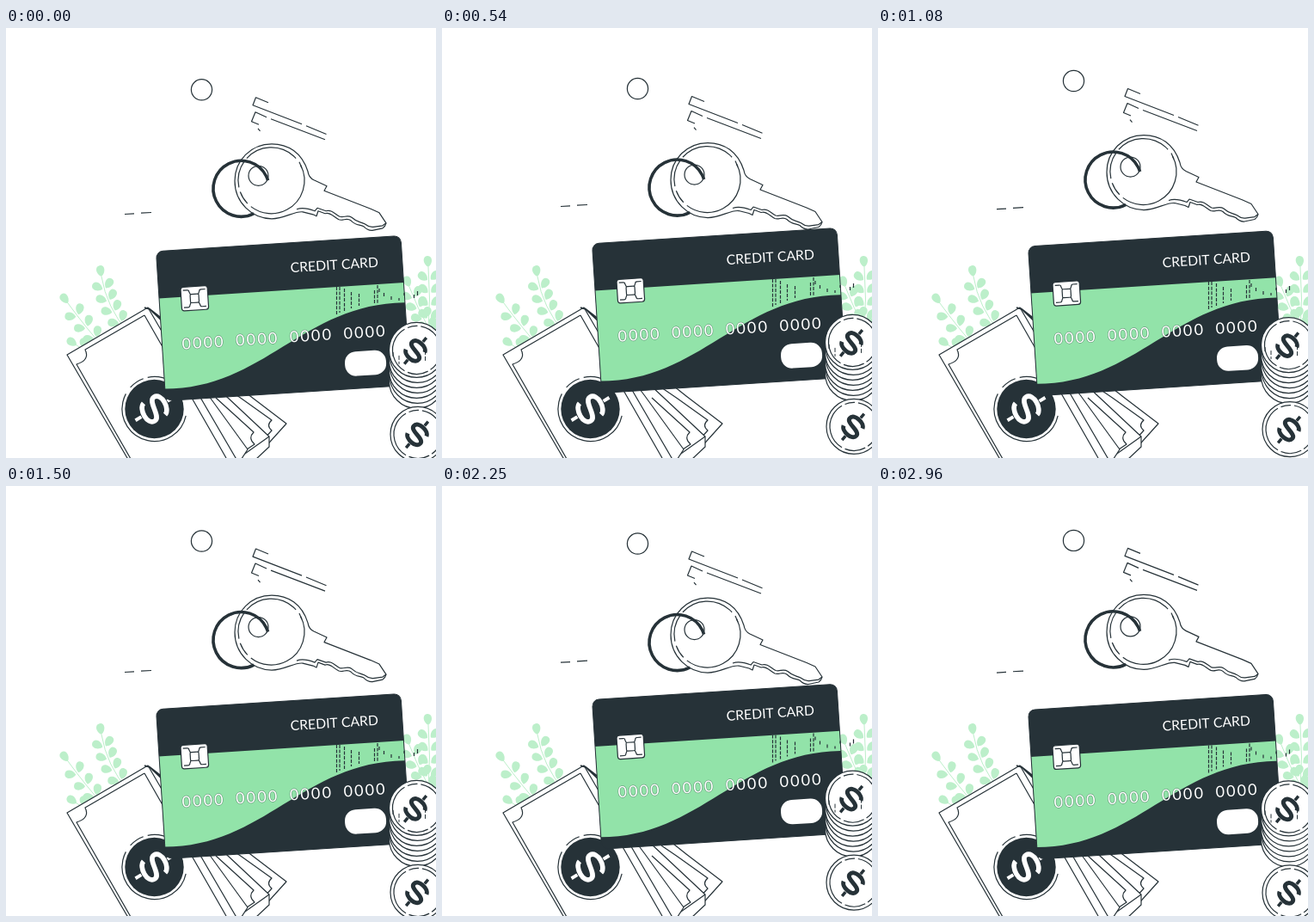
These frames come from a looping animation (500 by 500 pixels, 3 s). An HTML page with a canvas:

```html
<!DOCTYPE html>
<html lang="en">
<head>
<meta charset="utf-8">
<title>Credit card</title>
<style>
html, body { margin: 0; width: 100%; height: 100%; overflow: hidden; background: #fff; }
canvas { display: block; width: 500px; height: 500px; }
</style>
</head>
<body>
<canvas id="stage" width="500" height="500"></canvas>
<script>
const ctx = document.getElementById('stage').getContext('2d');
const DARK = '#263238', GREEN = '#92e3a9', LEAF = '#bcefca', WHITE = '#fff';
const LOOP = 3000, CYCLE = 1500, RISE = 12.5, LEAD = 35, KEY_DELAY = 500;

// Linear bob: up for half a cycle, down for the other half
function bob(t) {
  if (t <= 0) return 0;
  const p = (t % CYCLE) / CYCLE;
  return -RISE * (1 - Math.abs(1 - 2 * p));
}

function group(x, y, angle, draw) {
  ctx.save();
  ctx.translate(x, y);
  ctx.rotate(angle);
  draw();
  ctx.restore();
}

function stroke(path, width = 1.2, color = DARK) {
  ctx.lineWidth = width;
  ctx.strokeStyle = color;
  ctx.stroke(path);
}

function fill(path, color) {
  ctx.fillStyle = color;
  ctx.fill(path);
}

function line(d, width, color) {
  stroke(new Path2D(d), width, color);
}

function shape(d, color, width) {
  const p = new Path2D(d);
  fill(p, color);
  stroke(p, width);
}

function arc(x, y, r, from = 0, to = 360) {
  const p = new Path2D();
  p.arc(x, y, r, from * Math.PI / 180, to * Math.PI / 180);
  return p;
}

function box(x, y, w, h, r) {
  const p = new Path2D();
  p.roundRect(x, y, w, h, r);
  return p;
}

function dollar(x, y, deg, size, color, width) {
  group(x, y, deg * Math.PI / 180, () => {
    ctx.scale(size, size);
    line('M10 -6C8 -13 -10 -14 -10 -5.5C-10 2 10 -2 10 5.5C10 14 -8 13 -10 6', width, color);
    line('M0 -14.5V-21M0 14.5V21', width * 0.7, color);
  });
}

function leaf(x, y, angle, len) {
  group(x, y, angle, () => {
    const w = len * 0.48;
    fill(new Path2D(`M0 0C${len * 0.3} ${-w} ${len} ${-w} ${len} 0C${len} ${w} ${len * 0.3} ${w} 0 0Z`), LEAF);
  });
}

function branch(x0, y0, cx, cy, x1, y1, pairs) {
  line(`M${x0} ${y0}Q${cx} ${cy} ${x1} ${y1}`, 1, LEAF);
  for (let i = 0; i <= pairs; i++) {
    const u = i / pairs, v = 1 - u;
    const x = v * v * x0 + 2 * u * v * cx + u * u * x1;
    const y = v * v * y0 + 2 * u * v * cy + u * u * y1;
    const a = Math.atan2(v * (cy - y0) + u * (y1 - cy), v * (cx - x0) + u * (x1 - cx));
    if (i === pairs) leaf(x, y, a, 13);
    else for (const s of [-1, 1]) leaf(x + 2 * s * Math.cos(a + 1.5), y + 2 * s * Math.sin(a + 1.5), a + s * 0.85, 13);
  }
}

function plants() {
  branch(142, 354, 117, 325, 111, 289, 5);
  branch(114, 372, 94, 350, 72, 320, 4);
  branch(102, 378, 92, 376, 82, 369, 2);
  branch(491, 352, 494, 315, 491, 278, 5);
  branch(492, 350, 478, 325, 469, 301, 4);
}

function bills() {
  // Fanned notes behind the front one
  shape('M230 385L284 428L326 460L290 500H200Z', WHITE);
  line('M255 418L274 431L309 456Q302 462 309 468L280 500');
  shape('M215 390L258 430L306 475V487L290 502H200Z', WHITE);
  line('M306 475L268 502M244 430L288 470Q281 477 289 484L262 502');
  shape('M200 380L236 428L281 490L268 510H180Z', WHITE);

  shape('M71 380L165 325L270 505L200 560L141 500Z', WHITE);
  line('M161 334L92 374Q98 386 82 391L145 501M161 334L256 500');
  line('M161 325L167 327L186 345M166 326L184 340', 1.6);

  fill(arc(172.5, 443, 37), WHITE);
  fill(arc(172.5, 443, 34.2), DARK);
  stroke(arc(172.5, 443, 37.5, 12, 208));
  stroke(arc(172.5, 443, 37.5, 222, 250));
  stroke(arc(172.5, 443, 37.5, 258, 300));
  dollar(172.5, 443, 59, 1.22, WHITE, 4.6);
}

function dashes() {
  line('M138 216.6L149 216M157 215.3L169 214.6');
}

function keys() {
  stroke(arc(227.5, 72, 12.1));
  line('M305 87L290.5 81L287 90L344 112M349 114L372.5 123.7');
  line('M303 104L290 98L285.5 109L294 112.5M308 106L371 130M293 117L295.5 120');

  shape('M351 167C344 145 328 135 309 135C285 135 266 154 266 178' +
    'C266 203 286 222 309 222C324 222 335 213 345 214L357 217L361 219L363 213' +
    'L371 216C377 214 381 220 387 223C392 225 396 220 401 224C408 231 411 228 416 231' +
    'Q421 236 426 235.5L438 233Q441 231 442 227' +
    'L434 215L424 210.5L370 189.5L373 184L358 177Q352 174 351 167Z', WHITE);
  line('M338 211Q346 208 359 213L362 209.5L372 213C378 211 382 216 388 219.5' +
    'C393 221 397 217 402 220.5C409 227 412 225 417 228Q422 232 427 231.5L438 230L442 227');
  stroke(arc(308.5, 177.5, 38.5, -28, 128));
  stroke(arc(308.5, 177.5, 38.5, 136, 160));
  stroke(arc(308.5, 177.5, 38.5, 168, 216));
  stroke(arc(308.5, 177.5, 38.5, 222, 318));
  line('M341 156L344 163');
  stroke(arc(293.5, 172, 11.5));
  stroke(arc(273.5, 187, 32.5, 63, 343), 3.6);
}

function chip() {
  const body = box(-15.6, -13.8, 31.2, 27.6, 3);
  fill(body, WHITE);
  stroke(body);
  stroke(box(-5, -5, 10, 10, 1.5));
  for (const sx of [-1, 1])
    for (const sy of [-1, 1])
      line(`M${13 * sx} ${10 * sy}H${8 * sx}Q${6 * sx} ${10 * sy} ${6 * sx} ${8 * sy}L${4.5 * sx} ${4.5 * sy}`);
}

function digits() {
  ctx.font = '18px Lato, "Open Sans", sans-serif';
  ctx.textAlign = 'center';
  ctx.lineWidth = 1.2;
  ctx.strokeStyle = 'rgba(38,50,56,.42)';
  ctx.fillStyle = WHITE;
  for (let i = 0; i < 16; i++) {
    const x = 47.6 + 62.8 * Math.floor(i / 4) + 12.6 * (i % 4 - 1.5);
    ctx.strokeText('0', x, 115.5);
    ctx.fillText('0', x, 115.5);
  }
}

function card() {
  group(174, 260, -0.0645, () => {
    const body = box(0.5, 0, 285, 174, 8);
    fill(body, DARK);
    ctx.save();
    ctx.clip(body);
    fill(new Path2D('M0 54.6H286V77.8H284.6C167 72 115.5 167.4 0 160Z'), GREEN);
    ctx.restore();
    stroke(body, 1);

    ctx.font = '15.8px Lato, "Open Sans", sans-serif';
    ctx.textAlign = 'left';
    ctx.fillStyle = WHITE;
    ctx.fillText('CREDIT CARD', 155, 34.4);
    digits();
    group(41.7, 57.2, 0, chip);
    fill(box(211.2, 131, 48, 28.5, 13), WHITE);
  });

  ctx.save();
  ctx.setLineDash([4, 1.6]);
  line('M384.5 301V333M388 301V331M393.5 303V329M401.5 307V326M410.5 309V323M428.5 305V321M432 299V320');
  ctx.restore();
  line('M434 303V307M439.5 308V312M448 312V316M457 314V317M463 308V311M474.5 310V314M478.5 306V311');
}

function coinStack(x, y, count) {
  for (let i = count; i >= 0; i--) {
    const c = arc(x + (i % 2) * 0.8, y + i * 6, 32);
    fill(c, WHITE);
    stroke(c);
  }
  stroke(arc(x, y, 28, -80, 55));
  stroke(arc(x, y, 28, 62, 112));
  stroke(arc(x, y, 28, 120, 240));
  stroke(arc(x, y, 28, 248, 272));
}

function coins() {
  coinStack(477.5, 374.5, 6);
  line('M450 377V382M457 381V386M457 388V391M487.5 375V380M487.5 382V387', 1);
  dollar(476, 375.5, 40, 0.95, DARK, 5.2);
  coinStack(479, 472.5, 0);
  dollar(478, 473, 40, 0.95, DARK, 5.2);
}

function render(t) {
  ctx.fillStyle = WHITE;
  ctx.fillRect(0, 0, 500, 500);
  ctx.lineCap = 'butt';
  ctx.lineJoin = 'round';
  plants();
  bills();
  group(0, bob(t + LEAD - KEY_DELAY) - 0.2, 0, keys);
  group(0, bob(t + LEAD) + 0.5, 0, () => {
    dashes();
    card();
    coins();
  });
}

const start = performance.now();
function tick() {
  render((performance.now() - start) % LOOP);
  requestAnimationFrame(tick);
}
tick();
</script>
</body>
</html>
```
